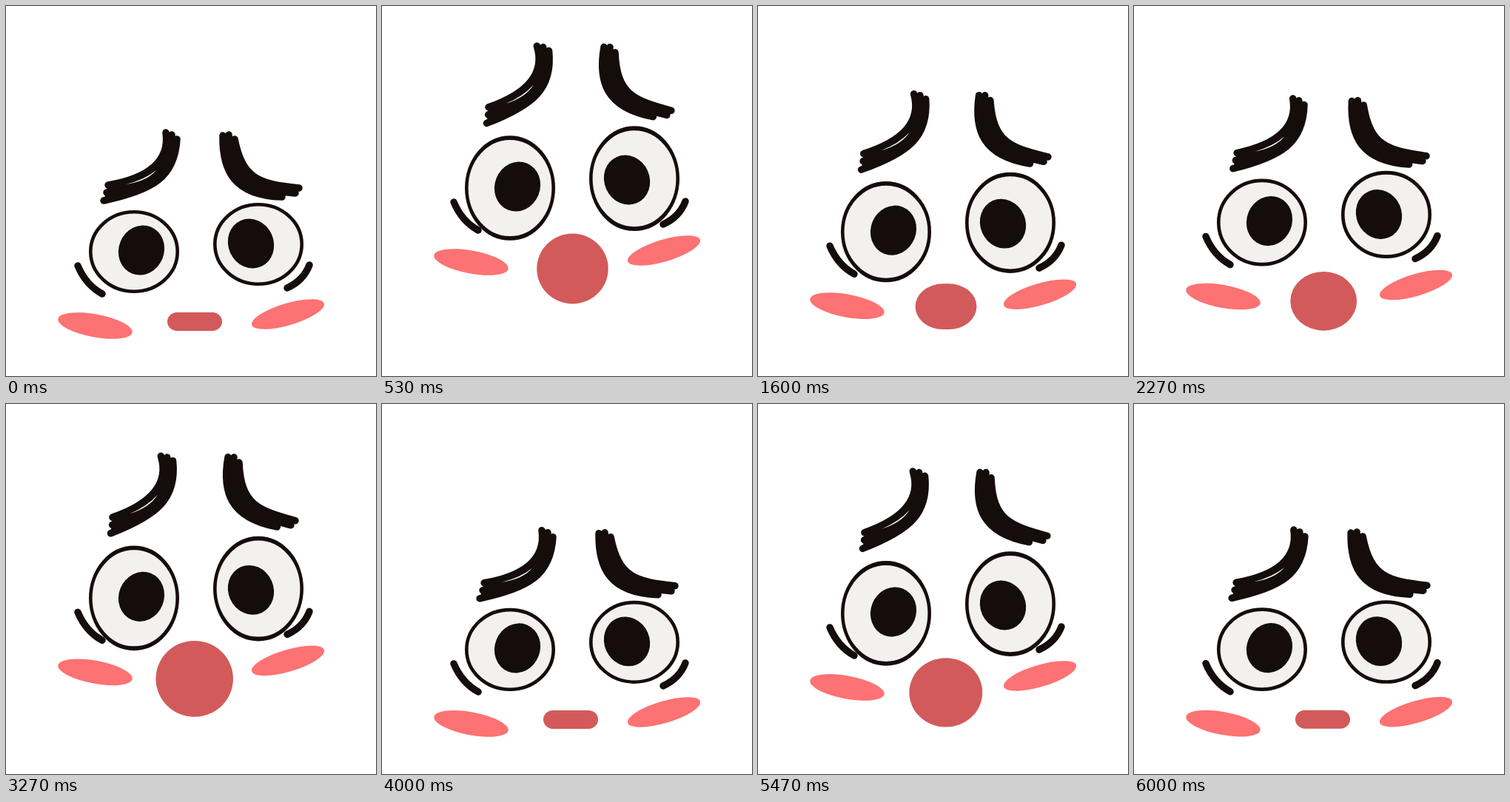
Recreate the animation shown at these times as an HTML page. Size 500 by 500 pixels, loop 6070 ms.

```html
<!DOCTYPE html>
<html lang="en">
<head>
<meta charset="utf-8">
<title>Worried face</title>
<style>
  html, body { margin: 0; width: 100%; height: 100%; overflow: hidden; background: #fff; }
  svg { display: block; width: 100%; height: 100%; }
  .ink { fill: #150d0b; }
  .line { fill: none; stroke: #150d0b; stroke-width: 9.5; stroke-linecap: round; }
  .white { fill: #f2f1ef; stroke: #150d0b; stroke-width: 4.6; }
  .cheek { fill: #fd7272; }
  .mouth { fill: #d35a5a; }
</style>
</head>
<body>
<svg viewBox="0 0 500 500">
  <g id="face">
    <g id="browL">
      <path class="ink" d="M216 171Q224 227 138 242L132 263C199 249 228 231 231 180Z"/>
      <path class="line" d="M216 171Q224 227 138 242M224 174C224 222 195 237 136 252M231 180C228 231 199 249 132 263"/>
      <path fill="#fff" d="M162 241Q187 235 203 222Q190 237 162 241Z"/>
    </g>
    <g id="browR">
      <path class="ink" d="M293 175C292 222 308 256 373 258L396 246C344 240 320 236 309 180Z"/>
      <path class="line" d="M293 175C292 222 308 256 373 258M301 174C302 220 325 248 391 253M309 180C320 236 344 240 396 246"/>
    </g>
    <g id="eyeL"><ellipse class="white" rx="58.7" ry="53.7"/></g>
    <g id="eyeR"><ellipse class="white" rx="58.7" ry="53.7"/></g>
    <ellipse class="ink" rx="30.6" ry="34" transform="translate(183 330) rotate(22)"/>
    <ellipse class="ink" rx="30.6" ry="34" transform="translate(331 321) rotate(-24)"/>
    <path class="line" d="M97 351Q108 377 130 389M410 350Q402 371 380 381"/>
    <ellipse class="cheek" rx="51" ry="15.5" transform="translate(120.5 432) rotate(10.5)"/>
    <ellipse class="cheek" rx="51" ry="14.8" transform="translate(381 416.5) rotate(-16.5)"/>
    <rect class="mouth" id="mouth"/>
  </g>
</svg>
<script>
const LOOP = 6070, STEP = 200 / 3, STEPS = 91, CYCLE = STEPS / 3;

const [face, browL, browR, eyeL, eyeR, mouth] =
  ["face", "browL", "browR", "eyeL", "eyeR", "mouth"].map(id => document.getElementById(id));

function set(el, attrs) {
  for (const name in attrs) el.setAttribute(name, attrs[name]);
}

// Sine ease from 0 to 1 between two times.
function ease(pos, from, to) {
  const u = Math.min(1, Math.max(0, (pos - from) / (to - from)));
  return (1 - Math.cos(Math.PI * u)) / 2;
}

const place = (el, x, y, more) => set(el, { transform: `translate(${x} ${y}) ${more}` });

function drawMouth(pos) {
  const opened = ease(pos, 0.5, 4.9), kept = 1 - ease(pos, 19, 28.4);
  const open = opened * kept;
  const w = 74 + opened * kept ** 1.7 * (16.5 + 0.75 * pos);
  const h = 25 + open * (64 + 0.74 * pos);
  const flat = 48 * (1 - open) ** 3;
  const x = 255 + 2.5 * open * Math.sin(Math.PI * pos / 18);
  const y = 426.5 + 14.5 * open;
  set(mouth, { x: x - w / 2, y: y - h / 2, width: w, height: h, rx: (w - flat) / 2, ry: h / 2 });
}

function draw(ms) {
  const step = Math.min(STEPS - 1, Math.floor((ms % LOOP + 5) / STEP));
  const pos = step % CYCLE;
  const lift = 86 * ease(pos, 0.3, 7.4) * (1 - ease(pos, 14.1, 30));
  const stretch = ease(pos, 1.8, 8) * (1 - ease(pos, 21.6, 30.1));
  const tall = `scale(1 ${1 + 0.265 * stretch})`;

  place(face, 0, -lift, "");
  place(browL, 2 * stretch, -26 * stretch, `rotate(${-9.4 * stretch} 181 221.5)`);
  place(browR, 0, -28 * stretch, `rotate(${8.8 * stretch} 333 217.5)`);
  place(eyeL, 173, 332, tall);
  place(eyeR, 341, 322 - 2.8 * stretch, tall);
  drawMouth(pos);
}

const start = performance.now();
function tick() {
  draw(performance.now() - start);
  requestAnimationFrame(tick);
}
tick();
</script>
</body>
</html>
```
